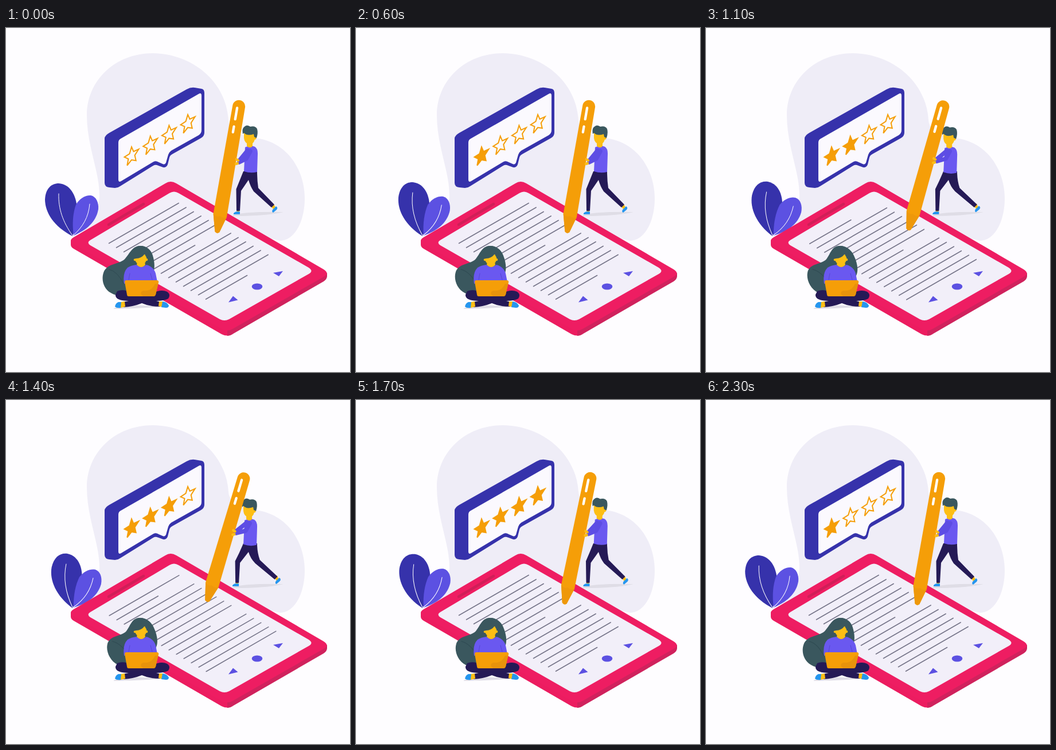
Write an HTML page that moves like this. It is 600 by 600 pixels and loops after 2400 ms.

```html
<!DOCTYPE html>
<html lang="en">
<head>
<meta charset="utf-8">
<title>Rating and review</title>
<style>
  html, body { margin: 0; width: 100%; height: 100%; overflow: hidden; background: #fefdff; }
  svg { display: block; width: 100vw; height: 100vh; }
  .indigo { fill: #3632ab; }
  .violet { fill: #5c51e2; }
  .shirt { fill: #6a58f0; }
  .skin { fill: #fdbe14; }
  .hair { fill: #3a575e; }
  .orange { fill: #f59e08; }
  .navy { fill: #251a56; }
  .shoe { fill: #2696ee; }
  .shadow { fill: #dfdde6; }
  .line { fill: none; stroke-linecap: round; stroke-linejoin: round; }
</style>
</head>
<body>
<svg viewBox="0 0 600 600" xmlns="http://www.w3.org/2000/svg">
  <path fill="#efedf7" d="M256 44C326 45 384 94 388 160C389 184 418 189 442 193C494 203 521 250 521 298C521 336 504 371 478 371L300 330L112 374C140 350 163 325 163 292C163 250 141 205 141 152C141 92 190 44 256 44Z"/>

  <g id="bubble">
    <path class="indigo" d="M172 192Q173 187 180 183L315 107Q322 103 329 104L341 106Q346 107 346 113L346 182Q346 189 340 192L290 220Q286 222 285 226L282 238Q280 244 274 243L263 239Q260 238 257 240L199 276Q195 279 190 279L180 278Q172 277 172 270Z"/>
    <path fill="#fbf9fe" d="M196 200Q196 195 200 193L336 115Q341 112 341 118L341 178Q341 184 336 187L288 214Q284 217 283 221L279 235Q277 239 273 237L264 233Q260 231 256 234L201 267Q196 270 196 264Z"/>
    <g id="stars" stroke="#f59e08" stroke-width="2"></g>
  </g>

  <g id="bigLeaf">
    <path class="indigo" d="M116 363C84 347 68 322 68 299C69 280 79 271 92 271C111 272 123 291 124 316C124 338 120 352 116 363Z"/>
    <path class="line" stroke="#fff" d="M116 362C99 338 91 315 92 289"/>
  </g>
  <g id="smallLeaf">
    <path class="violet" d="M118 362C115 340 117 322 122 308C129 296 140 291 148 292C157 294 162 304 161 316C158 334 146 350 118 362Z"/>
    <path class="line" stroke="#fff" d="M118 361C134 347 144 330 146 307"/>
  </g>

  <g id="tablet">
    <path fill="#ec1c60" d="M113 370L113 378Q113 382 118 385L376 534Q386 539 395 534L400 520L300 400Z"/>
    <path fill="#d0225d" d="M386 522L386 537Q391 537 395 534L554 442Q560 438 560 433L560 427Z"/>
    <path fill="#ee1d62" d="M278 271Q287 265 297 271L554 421Q565 428 554 434L395 525Q386 530 376 525L118 377Q108 371 118 365Z"/>
    <path class="line" stroke="#d01f58" stroke-width="4.5" d="M179 343L240 307"/>
    <path fill="#f2eff9" d="M285 288Q293 283 301 288L528 418Q537 424 528 429L389 508Q381 512 373 508L147 379Q140 374 147 370Z"/>
    <path id="text" class="line" stroke="#77768a" stroke-width="1.7"/>
    <path class="violet" d="M396 467.5L388 478.5L404.5 474.5ZM466 427L483 424L476 433Z"/>
    <ellipse class="violet" cx="438" cy="451" rx="9.3" ry="5.5"/>
  </g>

  <g id="girl">
    <path class="shadow" d="M188 489Q205 483 240 484L272 486Q235 489 188 490Z"/>
    <g id="girlHair">
      <path class="hair" d="M233 380C244 379 253 386 256 397C259 407 260 417 257 426C252 440 238 447 227 454C218 468 197 471 183 462C170 455 166 439 170 427C176 409 199 413 208 402C216 393 220 381 233 380Z"/>
      <path class="line" stroke="#2f4a52" stroke-width="1" d="M180 421Q195 425 205 446"/>
    </g>
    <path class="shirt" d="M227 413Q236 419 245 413Q257 416 261 428L264 443L206 446Q203 427 212 418Q218 414 227 413Z"/>
    <path class="line" stroke="#5647d4" d="M216 428L214 439M252 428L255 439"/>
    <path class="skin" d="M230 404L241 404L243 413Q236 421 228 413Z"/>
    <path class="skin" d="M225 396Q235 391 245 396L245 404Q243 413 235 413Q227 412 225 404Z"/>
    <circle class="skin" cx="225" cy="404" r="2.3"/>
    <circle class="skin" cx="245" cy="404" r="2.3"/>
    <path class="hair" d="M222 403Q218 381 235 380Q252 381 248 403Q244 400 242 394Q236 402 227 402Z"/>
    <path class="navy" d="M194 459Q206 454 220 463L255 463Q270 455 281 460Q288 465 283 472Q276 476 262 476L270 478L269 486Q250 486 237 480Q222 486 205 487L204 478L214 476Q190 476 191 465Z"/>
    <path class="skin" d="M200 478L207 477L208 486L200 488ZM267 477L274 477L273 487L266 485Z"/>
    <path class="shoe" d="M201 478L200 488Q193 489 190 486Q191 480 196 478ZM273 477Q281 478 284 484Q284 488 279 488L271 487Z"/>
    <path class="orange" d="M210 440L263 440Q267 440 266 444L261 465Q260 468 257 468L214 468Q211 468 211 465L207 443Q207 440 210 440Z"/>
    <path fill="#e8930b" d="M260 446L265 446L261 465Q260 468 257 468L239 468Q231 461 240 458Q254 460 260 446Z"/>
  </g>

  <g id="man">
    <path class="shadow" d="M396 326Q420 320 484 321Q455 328 396 328Z"/>
    <g id="backFoot">
      <path class="skin" d="M402.5 316L407 316L407 321L402.5 321Z"/>
      <path class="shoe" d="M402 320L408 320L408 325L397 325Q396 322 402 320Z"/>
    </g>
    <g id="frontFoot">
      <path class="skin" d="M462 310L467 307L470 313L466 316Z"/>
      <path class="shoe" d="M465 317L471 311Q475 313 472 317L466 322Q463 321 465 317Z"/>
    </g>
    <path id="legs" class="navy"/>
    <g id="torso">
      <path class="shirt" d="M417 208Q426 204 434 207Q439 210 439 219L438 251Q427 254 415 250L416 230Z"/>
      <path class="skin" d="M420 196L430 196L430 206Q426 211 420 206Z"/>
      <path class="skin" d="M415 181L434 181L434 194Q432 203 424 203Q416 201 415 192Z"/>
      <circle class="skin" cx="434" cy="192" r="2.6"/>
      <path class="hair" d="M413 185Q411 175 416 172Q420 168 426 172Q435 170 438 176Q440 183 437 192L433 190L432 185Q421 189 415 183Z"/>
    </g>
  </g>

  <g id="pen">
    <g transform="translate(408 126) rotate(9.8)">
      <path class="orange" d="M-11 11A11 11 0 0 1 11 11L12 205L4 233Q0 237-4 233L-12 203Z"/>
      <path fill="#ee980a" d="M-12 203Q-6 209 0 205Q6 209 12 205L4 233Q0 237-4 233Z"/>
      <path class="line" stroke="#fff" stroke-width="4.3" d="M-2.5 14V34M-2.5 47V57"/>
    </g>
  </g>
  <path id="arm" class="line" stroke="#5d4de4" stroke-width="7.5"/>
  <path id="hands" class="line" stroke="#fdbe14" stroke-width="4.5"/>
</svg>

<script>
  const LOOP = 2400, STEP = 100;
  const PITCH = 13, SLOPE = 7.5 / 13;
  const fillOn = [400, 800, 1200, 1600];
  const fillOff = [2400, 2200, 2100, 2000];
  const $ = id => document.getElementById(id);
  const set = (id, name, value) => $(id).setAttribute(name, value);
  const ease = (t, from, to) => {
    const x = Math.min(1, Math.max(0, (t - from) / (to - from)));
    return (1 - Math.cos(Math.PI * x)) / 2;
  };

  function starPoints(cx, cy) {
    const points = [];
    for (let i = 0; i < 10; i++) {
      const r = i % 2 ? 6.6 : 14.6, a = i * Math.PI / 5;
      const x = r * Math.sin(a), y = -r * Math.cos(a);
      points.push((cx + x * 0.9).toFixed(1) + ',' + (cy + y * 1.06 - x * 0.5).toFixed(1));
    }
    return points.join(' ');
  }

  const stars = fillOn.map((_, i) => {
    const star = document.createElementNS('http://www.w3.org/2000/svg', 'polygon');
    star.setAttribute('points', starPoints(219 + 32.7 * i, 223 - 18.8 * i));
    $('stars').append(star);
    return star;
  });

  // Two paragraphs of seven lines scroll past; each seventh line is short.
  function textPath(shift) {
    let d = '';
    for (let k = 0; k < 29; k++) {
      const s = k * PITCH - shift;
      if (s < -6.5 || s > 172) continue;
      const w = k % 7 === 6 ? 72 : 121.5;
      d += `M${179.6 + s} ${375.6 + s * SLOPE}l${w} ${-w * SLOPE}`;
    }
    return d;
  }

  function draw(t) {
    const sway = (1 - Math.cos(2 * Math.PI * t / LOOP)) / 2;
    const push = ease(t, 600, 1300) - ease(t, 1300, 1900);

    set('bigLeaf', 'transform', `rotate(${10.5 * sway} 116 363)`);
    set('smallLeaf', 'transform', `rotate(${7 * sway} 118 361)`);
    set('girlHair', 'transform', `translate(0 385) skewX(${9.6 * sway}) translate(0 -385)`);

    stars.forEach((star, i) => {
      const on = t >= fillOn[i] && t < fillOff[i];
      star.setAttribute('fill', on ? '#f59e08' : 'none');
    });

    set('text', 'd', textPath(14 * PITCH * ease(t, 650, 1650)));
    set('pen', 'transform', `rotate(${7.25 * push} 406 207)`);

    const back = -2 * push, front = 6 * push;
    set('torso', 'transform', `translate(${-push} ${2 * push})`);
    set('backFoot', 'transform', `translate(${back} 0)`);
    set('frontFoot', 'transform', `translate(${front} ${-push})`);
    set('legs', 'd', `M414 250L438 250Q438 266 ${440 + front / 2} 279L${468 + front} 308L${463 + front} 313` +
      `L${432 + front / 2} 285Q426 276 423 265L${410 + back} 284L${408 + back} 319L${402 + back} 319L${401.5 + back} 281Q408 265 414 250Z`);

    const hx = 403 - 6 * push, hy = 235 - 2 * push;
    set('arm', 'd', `M${426 - push} 215L${419 - push} 228L${hx + 4} ${hy - 1}M${421 - push} 214L${hx + 5} ${hy - 5}`);
    set('hands', 'd', `M${hx + 1} ${hy + 1}L${hx - 2} ${hy + 2}M${hx + 2} ${hy - 4}L${hx - 1} ${hy - 6}`);
  }

  const start = performance.now();
  function tick() {
    const t = Math.max(0, performance.now() - start) % LOOP;
    draw(Math.floor(t / STEP) * STEP);
    requestAnimationFrame(tick);
  }
  draw(0);
  requestAnimationFrame(tick);
</script>
</body>
</html>
```
